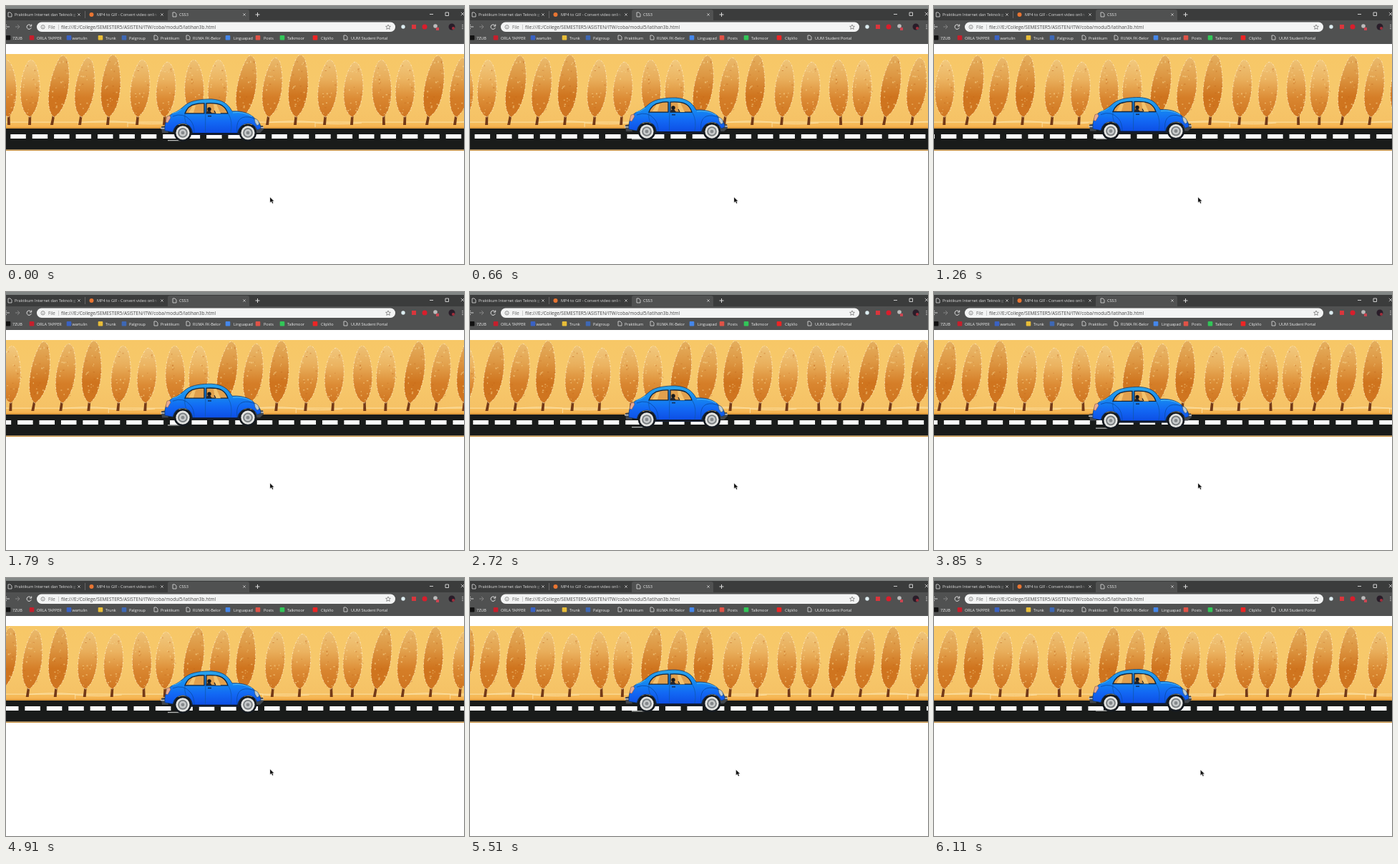
An HTML page with a canvas that plays this animation: 640 px wide and 360 px high, repeating every 6.18 s.

```html
<!DOCTYPE html>
<html lang="id">
<head>
<meta charset="utf-8">
<title>CSS3</title>
<style>
html, body { margin: 0; width: 100%; height: 100%; overflow: hidden; background: #fff; }
canvas { display: block; width: 640px; height: 360px; }
</style>
</head>
<body>
<canvas id="stage" width="640" height="360"></canvas>
<script>
const stage = document.getElementById('stage');
const c = stage.getContext('2d');
const LOOP = 6180, STEP = LOOP / 93, TILE = 262;

// x of the crown, top, foot of the trunk, depth of colour
const trees = [
  [34, 75, 33, 0], [75, 69, 64, 1], [111, 72, 103, .6], [147, 68, 142, 1],
  [188, 75, 183, .2], [224, 78, 221, .1], [263, 75, 266, .3]
];

function rect(x, y, w, h, color, r = 0) {
  c.fillStyle = color;
  c.beginPath();
  c.roundRect(x, y, w, h, r);
  c.fill();
}
function disc(x, y, r, color) {
  c.fillStyle = color;
  c.beginPath();
  c.arc(x, y, r, 0, 7);
  c.fill();
}
function shape(d, fill, stroke, width = 1) {
  const p = new Path2D(d);
  if (fill) { c.fillStyle = fill; c.fill(p); }
  if (stroke) { c.strokeStyle = stroke; c.lineWidth = width; c.stroke(p); }
}
function text(s, x, y, size, color) {
  c.font = size + 'px "Open Sans", sans-serif';
  c.fillStyle = color;
  c.fillText(s, x, y);
}
function fade(y0, y1, ...colors) {
  const g = c.createLinearGradient(0, y0, 0, y1);
  colors.forEach((color, i) => g.addColorStop(i / (colors.length - 1), color));
  return g;
}
function pageIcon(x, y) {
  shape(`M${x - 2} ${y - 3}h3l2 2v4h-5z`, null, '#ddd', .8);
}
function cross(x, y, s, color) {
  shape(`M${x - s} ${y - s}l${2 * s} ${2 * s}m0 ${-2 * s}l${-2 * s} ${2 * s}`, null, color, .8);
}

function browser() {
  rect(0, 0, 640, 4, '#828685');
  rect(0, 4, 640, 17, '#3b3c3c');
  rect(0, 20, 640, 33, '#505151');
  rect(226, 5, 114, 17, '#505151', 3);
  pageIcon(5, 12);
  text('Praktikum Internet dan Teknolog', 12, 14, 5.6, '#ddd');
  disc(119.5, 12, 3, '#e87532');
  text('MP4 to GIF - Convert video onlin', 127, 14, 5.6, '#ddd');
  pageIcon(235, 12);
  text('CSS3', 242, 14, 5.6, '#eee');
  rect(92, 6, 6, 12, '#3b3c3c99');
  rect(206, 6, 6, 12, '#3b3c3c99');
  rect(110, 7, 1, 10, '#666');
  for (const x of [102, 218, 333]) cross(x, 12, 1.7, '#ccc');
  shape('M348.5 12h6m-3-3v6', null, '#ddd');
  shape('M592 11.5h5M614 9h4.5v4.5h-4.5z', null, '#ddd', .9);
  cross(638, 11, 2.2, '#ddd');

  shape('M5 29h-7m3-3l-3 3l3 3', null, '#ddd', .9);
  shape('M13 29h6m-3-3l3 3l-3 3', null, '#888', .9);
  shape('M35 27.5a3.2 3.2 0 1 0 .3 2.7M35.7 25.5v2.6h-2.7', null, '#e4e4e4', 1);
  rect(43, 22.5, 501, 13.5, '#f3f4f4', 6.7);
  shape('M49 29.3a2.6 2.6 0 1 0 5.2 0a2.6 2.6 0 1 0 -5.2 0M51.6 29v1.6M51.6 27.6v.5', null, '#666', .7);
  text('File', 59, 31.5, 6.2, '#666');
  rect(73, 26, .7, 7, '#bbb');
  text('file:///E:/College/SEMESTER5/ASISTEN/ITW/coba/modul5/latihan3b.html', 77, 31.5, 6.5, '#454545');
  shape('M534 26l1 2.2 2.4.2-1.8 1.6.6 2.4-2.2-1.3-2.2 1.3.6-2.4-1.8-1.6 2.4-.2z', null, '#666', .7);
  disc(555, 29, 2.7, '#dcecf0');
  rect(567, 26, 6, 6, '#d9363c');
  disc(585, 29, 3.5, '#d81e2c');
  disc(600, 28, 2.8, '#bbb');
  rect(601, 30, 4, 4, '#c94652');
  disc(623, 29, 4.5, '#291d29');
  disc(625, 31, 2, '#a22f3c');
  for (const y of [26.5, 29, 31.5]) disc(638, y, .7, '#ddd');

  const marks = [
    [3, '#111', '7ZUB', 9], [36, '#c51f2c', 'ORLA TAPPER', 43], [88, '#3a62c4', 'wartulin', 92.5],
    [132, '#e8bd38', 'Trunk', 139], [165, '#3e68b4', 'Palgroup', 172], [209, 0, 'Praktikum', 216],
    [254, 0, 'RUMA FK-Belor', 261], [310, '#4587ea', 'Linguapad', 318], [352, '#e05347', 'Posts', 360],
    [386, '#32c658', 'Talkmoor', 393], [432, '#ed2525', 'ClipVio', 440], [474, 0, 'UUM Student Portal', 482]
  ];
  for (const [x, color, label, lx] of marks) {
    if (color) rect(x - 3.3, 41, 6.6, 6.6, color, 1);
    else pageIcon(x, 44);
    text(label, lx, 46.5, 5.5, '#eee');
  }
}

function tree(x, top, foot, depth, seed) {
  const low = x + (foot - x) * .7;
  const rnd = () => (seed = seed * 16807 % 2147483647) / 2147483647;
  shape(`M${foot - 2} 166L${low - 1} 146h3L${foot + 2} 166z`, '#743a18');
  const lean = (x - foot) * .35;
  const crown = `M${low} 155C${x - 17 - lean} 147 ${x - 17} 105 ${x - 6 + lean} ${top + 7}`
    + `Q${x + lean} ${top - 6} ${x + 7 + lean} ${top + 6}C${x + 17} 103 ${x + 15 - lean} 144 ${low} 155z`;
  const tone = (l, d) => `rgb(${l.map((v, i) => v + (d[i] - v) * depth)})`;
  shape(crown, fade(top, 155,
    tone([242, 201, 126], [229, 175, 94]),
    tone([236, 181, 98], [221, 151, 67]),
    tone([221, 142, 55], [207, 116, 30]),
    '#cf7520'));
  c.setLineDash([3, 1.5, 1, 2]);
  shape(crown, null, 'rgba(255,236,198,.75)', 1);
  c.setLineDash([]);
  for (let i = 0; i < 26; i++) {
    const h = rnd(), y = top + 6 + h * 70, w = 5 + 9 * Math.sin(Math.PI * h);
    const px = x + (rnd() * 2 - 1) * w + lean * (1 - 2 * h);
    rect(px, y, 1 + rnd() * 1.5, 1 + rnd(), i % 3 ? 'rgba(250,218,150,.55)' : 'rgba(185,95,25,.35)');
  }
}

function scene(t) {
  c.save();
  c.beginPath();
  c.rect(0, 67, 640, 135);
  c.clip();
  rect(0, 67, 640, 104, fade(67, 171, '#f7c766', '#f7c96c', '#f5c064'));
  rect(0, 162, 640, 9, fade(162, 171, '#f5bd5c', '#f7b04c'));
  rect(0, 161.5, 640, 1.2, '#fbdc98');
  rect(0, 169, 640, 2, '#dd9a3d');
  const shift = t * .0149;
  for (let k = -1; k < 4; k++) {
    const x = k * TILE - shift;
    shape(`M${x + 100} 163q35 -4 70 -1v7m0 -6q34 3 65 0`, null, '#fde2a8', .9);
    trees.forEach(([cx, top, foot, depth], i) => tree(cx + x, top, foot + x, depth, 991 * (i + 3)));
  }
  rect(0, 171, 640, 29.5, '#191b1a');
  rect(0, 200.5, 640, 1.5, '#c79346');
  const gap = 30.42, start = (6.3 - t * .0454) % gap - gap;
  for (let x = start; x < 640; x += gap) rect(x, 179, 21.5, 6, '#fff');
  c.restore();
}

function wheel(x) {
  disc(x, 177, 12.2, '#151a20');
  disc(x, 177, 9.6, '#e4e5e3');
  disc(x, 177, 6.8, '#767b7e');
  disc(x, 177, 5, '#c6c9ca');
  disc(x, 177, 2.4, '#85898c');
}

function car(t) {
  const bob = 2.5 * Math.cos((t - 3650) / 4900 * 2 * Math.PI);
  c.save();
  c.setTransform(1, 0, 0, 1, 0, bob);
  rect(226, 187, 18, 1.3, '#b8bab8');
  shape('M217 168l6 -1 4 10h-9zM350 167h9l1 5-5 5h-9z', '#42464c');
  rect(216, 170, 8, 1.5, '#c5c9cb');
  rect(353, 169, 7, 1.5, '#c5c9cb');
  shape('M228 166h122l-5 14h-108z', '#172033');
  // body with roof, bonnet and wings
  shape('M222 174C221 162 226 153 233 150C241 147 245 143 251 138C260 131 275 130 287 130'
    + 'C302 131 310 136 316 147C332 146 344 151 350 160Q356 163 356 171L351 173'
    + 'Q347 164 338 164Q326 165 323 178H261Q259 164 247 164Q236 164 233 176z',
    fade(130, 178, '#2ba5ec', '#168cf0', '#1268f4', '#0d4de4'), '#123d72', .8);
  shape('M250 150Q254 139 265 137Q271 135.5 277 136V150zM280 136Q295 135 302 139Q308 143 310 150H280z',
    '#e1a04d', '#10243d', 1.3);
  shape('M255 149l6 -10h4l-3 10zM292 150l-2 -13h4l6 13z', '#f3c36e');
  // person at the steering wheel
  disc(284, 144, 2.7, '#17191c');
  shape('M280 150q1 -5 5 -4l3 4z', '#24252b');
  shape('M291 146l2 4', null, '#24252b', 1.2);
  shape('M279 136L278.5 176M250 151Q248 163 259 175M311 151Q317 161 314 177', null, '#1157aa', .8);
  shape('M233 154Q248 148 258 160Q263 166 263 177M323 177Q320 153 339 155Q350 156 355 167', null, '#0b4dac', .9);
  shape('M232 150Q239 149 245 144M317 149Q331 147 344 154', null, '#55c2f7', .9);
  rect(282, 153, 5, 1.4, '#12284d');
  rect(260, 177, 64, 2, '#10182a');
  shape('M225 154l4 -1 1 3-4 7-3 -1z', '#e7aa93', '#69433e', .5);
  shape('M347 157q6 1 7 8l-3 2q-4 -4 -4 -10z', '#bccbd3', '#29455f', .6);
  wheel(247);
  wheel(338);
  c.restore();
}

function cursor(t) {
  const p = Math.min(1, Math.max(0, (t - 5200) / 400));
  const x = 369 + 3.5 * p, y = 267 + p;
  shape(`M${x} ${y}v7.2l1.8-1.6 1.4 3 1.2-.6-1.3-2.8h2.3z`, '#111', '#999', .3);
}

function draw(now) {
  const t = Math.floor(now % LOOP / STEP + .12) % 93 * STEP;
  rect(0, 0, 640, 360, '#fff');
  browser();
  scene(t);
  car(t);
  cursor(t);
}
const begin = performance.now();
function tick() {
  draw(performance.now() - begin);
  requestAnimationFrame(tick);
}
tick();
</script>
</body>
</html>
```
